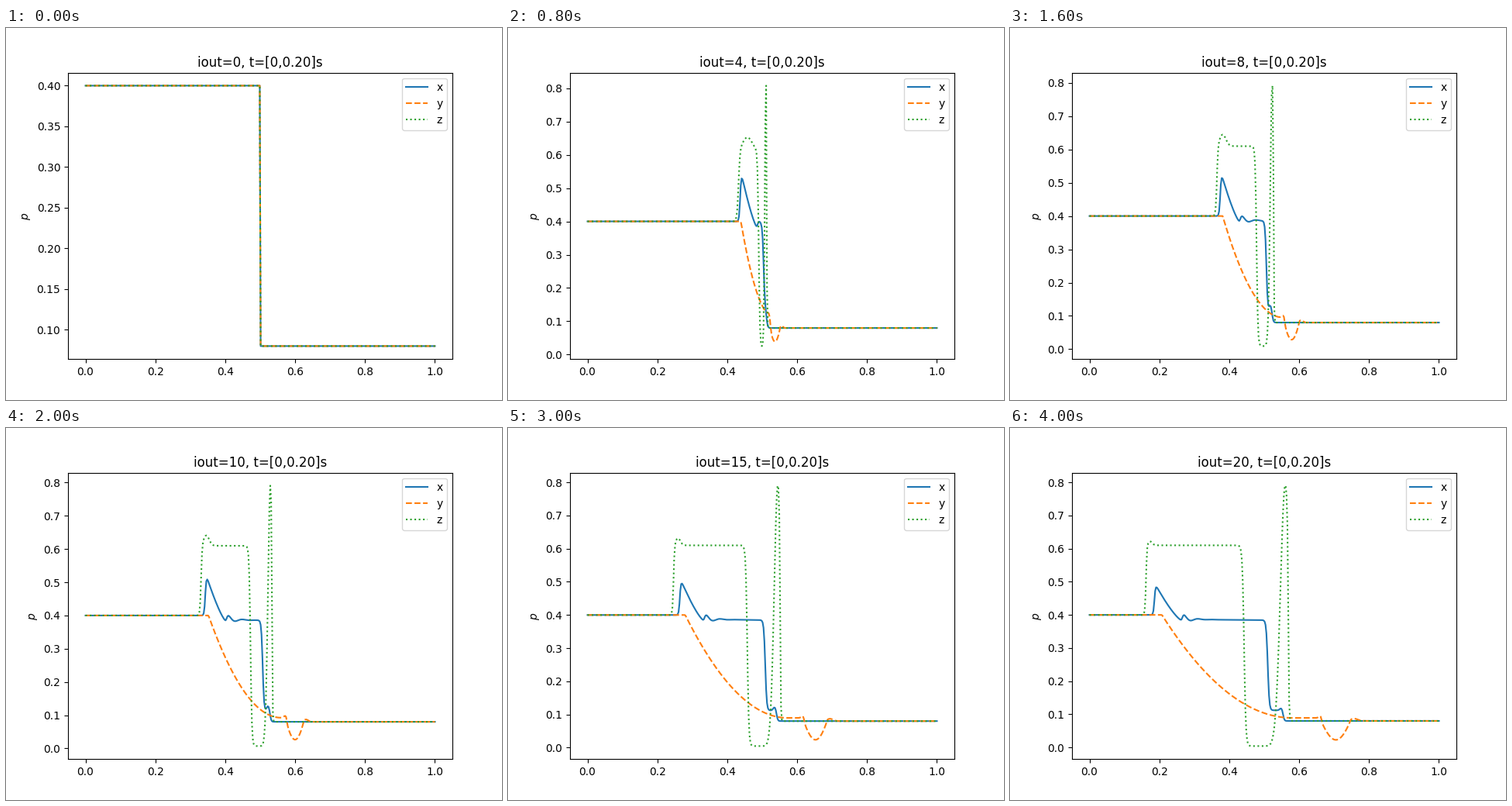
A matplotlib script that plays this animation: 640x480 px, repeating every 4200 ms.

```python
import matplotlib.pyplot as plt
import numpy as np
from matplotlib.animation import FuncAnimation

FRAMES, INTERVAL = 21, 200
LEFT, RIGHT = 0.4, 0.08

x = np.linspace(0, 1, 400)


def step(center, width):
    """Smooth rise from 0 to 1."""
    return .5 + .5 * np.tanh((x - center) / (2 * width))


def bump(center, width):
    return np.exp(-((x - center) / width) ** 2 / 2)


def mix(before, after, amount):
    return before + (after - before) * amount


def curve_x(n):
    root = n ** .5
    front = .5 - .0157 * n
    blip = .5476 - .01384 * n

    # Decay behind the front, then a damped ringing around the plateau
    u = np.clip((x - front) / (blip - .008 - front), 0, 1)
    hump = .384 + (.225 - .0251 * root) * (1 - u) ** 1.3
    lag = np.maximum(x - blip, 0)
    plateau = .384 + .004 * np.exp(-lag / .1)
    ringing = .012 * np.cos(2 * np.pi * lag / .042) * np.exp(-lag / .02)
    hump = mix(hump, plateau + ringing, step(blip - .005, .0013))
    left = mix(LEFT, hump, step(front, .0016))

    shock = .5031 + .00257 * n
    ledge = .112 + .04 * np.exp(-n / 11) * bump(shock - .006, .004)
    right = mix(ledge, RIGHT, step(shock, .0017))
    return mix(left, right,
               step(.49956 + .00237 * root, .00133 + .0002 * root))


def curve_y(n):
    # Parabolic fan down to a ledge
    front = .4969 - .01448 * n
    end = .5932 - .0931 * np.exp(-n / 10)
    ledge = .089 + .1 * np.exp(-n / 2.95)
    u = np.clip((x - front) / (end - front), 0, 1)
    fan = ledge + (LEFT - ledge) * (1 - u) ** 2

    # Trough between two small crests
    start, length = .4859 + .0088 * n, .0171 + .00347 * n
    depth = .0575 - .045 * np.exp(-n / 4)
    phase = np.clip((x - start) / length, 0, 1)
    crests = (.006 * bump(start - .002, .004)
              + .007 * bump(start + 1.1 * length, .12 * length))
    return (mix(fan, RIGHT, step(start + .002, .0015))
            - depth * np.sin(np.pi * phase) + crests)


def curve_z(n):
    front = .4997 - .0169 * n
    drop = .502 - .00298 * n
    peak = .4983 + .0031 * n
    shock = step(peak + .0009 + .0004 * n, .0005 + .00003 * n)

    lag = .008 + .07 / n
    plateau = .61 + (.05 - .0019 * n) * bump(front + lag, .55 * lag)
    left = mix(LEFT, plateau, step(front, .0012 + .004 / n))
    floor = .004 + .06 * np.exp(-n / 3.3)
    base = mix(left, floor, step(drop, .0015 + .00005 * n))

    # The crest settles after an early sag
    top = .79 + .12 * np.exp(-n / 2) - .067 * np.exp(-(n - 6) ** 2)
    spike = bump(peak, .0003 + .00067 * n) * (1 - shock)
    return mix(base, RIGHT, shock) + (top - floor) * spike / spike.max()


def curves(n):
    if n == 0:
        return [np.where(x < .5, LEFT, RIGHT)] * 3
    return [curve_x(n), curve_y(n), curve_z(n)]


fig, ax = plt.subplots(figsize=(6.4, 4.8), dpi=100)


def draw(n):
    ax.clear()
    for values, style, name in zip(curves(n), ("-", "--", ":"), "xyz"):
        ax.plot(x, values, style, label=name)
    ax.set_ylabel("$p$")
    ax.set_title(f"iout={n}, t=[0,0.20]s")
    ax.legend(loc="upper right")


anim = FuncAnimation(fig, draw, frames=FRAMES, interval=INTERVAL,
                     init_func=lambda: None, repeat=True, repeat_delay=0)
plt.show()
```
